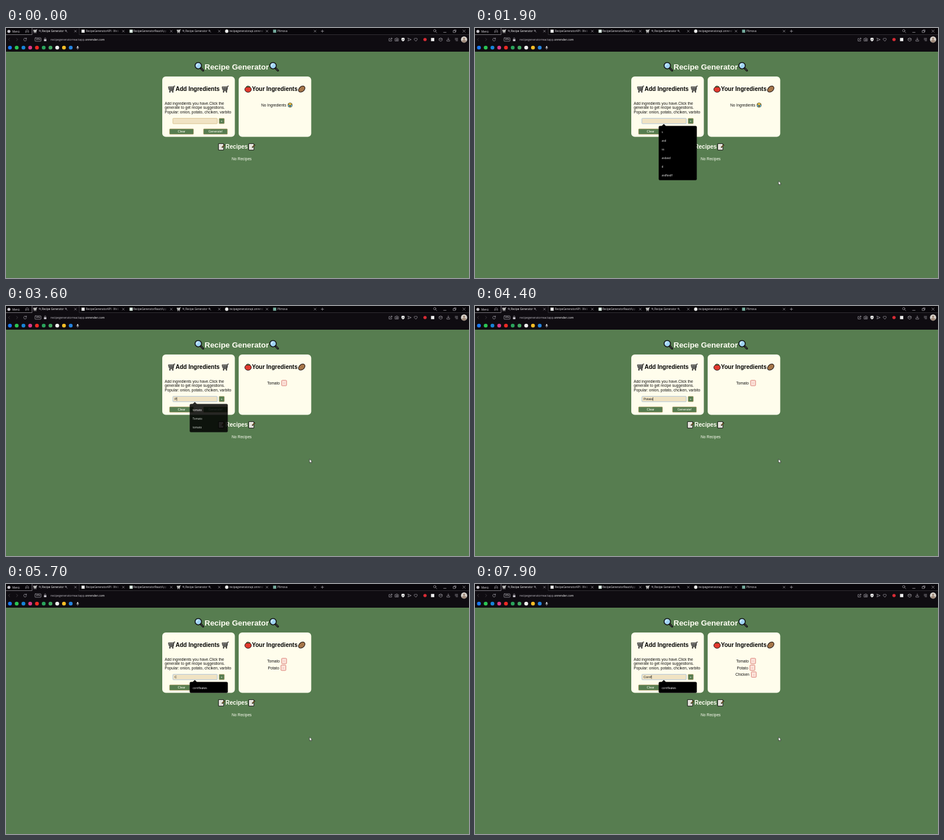
These frames come from a looping animation (800x433 px, 8000 ms). An HTML page:

```html
<!DOCTYPE html>
<html lang="en">
<head>
<meta charset="utf-8">
<title>Recipe Generator</title>
<style>
  html, body { margin: 0; width: 100%; height: 100%; overflow: hidden; background: #577d50; }
  svg { display: block; width: 100vw; height: 100vh; }
  text { font-family: "Liberation Sans", Arial, sans-serif; font-size: 6.667px; fill: #111; white-space: pre; }
  .ui text, #popup text { font-family: "Open Sans", "Noto Sans", sans-serif; fill: #e6e3e8; }
  .ui text { font-size: 4.7px; }
  .ui .url { font-size: 5.07px; }
  .ui .fade { fill: url(#fade); }
  #popup text { font-size: 4.65px; fill: #fff; }
  .h1 { font-size: 13.333px; font-weight: bold; }
  .h2 { font-size: 10px; font-weight: bold; fill: #000; }
  .light { fill: #fffff4; }
  .small { font-size: 5.56px; }
  .mid { text-anchor: middle; }
  .line { fill: none; stroke: #b9b5bd; stroke-width: .65; stroke-linecap: round; stroke-linejoin: round; }
  .button { fill: #577d50; stroke: #c3a267; stroke-width: .6; }
</style>
</head>
<body>
<svg viewBox="0 0 800 433" preserveAspectRatio="none" xmlns="http://www.w3.org/2000/svg">
  <defs>
    <linearGradient id="fade">
      <stop offset=".84" stop-color="#e6e3e8"/><stop offset="1" stop-color="#e6e3e8" stop-opacity=".15"/>
    </linearGradient>
    <symbol id="lens" viewBox="0 0 16 16">
      <path d="M10 10l4.2 4.2" stroke="#111" stroke-width="3.2" stroke-linecap="round"/>
      <path d="M11 11l2.8 2.8" stroke="#454545" stroke-width="1.3" stroke-linecap="round"/>
      <circle cx="6.2" cy="6.2" r="5.2" fill="#9fd3f5" stroke="#111" stroke-width="1.4"/>
      <path d="M3.6 7A3.2 3.2 0 0 1 6.6 3.4" fill="none" stroke="#e4f5ff" stroke-width="1.2"/>
    </symbol>
    <symbol id="cart" viewBox="0 0 12 12">
      <g fill="none" stroke="currentColor" stroke-linejoin="round" stroke-linecap="round">
        <path d="M.8 2.8l1.2 4.6h6.6l.9-4.6z" fill="#a5a5a0" stroke-width=".9"/>
        <path d="M3.4 3l.5 4.2M5.4 3v4.2M7.4 3L7 7.2M1.4 5.1h7.7" stroke-width=".55"/>
        <path d="M11.4 1.1H9.9L8.4 8.8H2.6" stroke-width="1"/>
      </g>
      <g fill="currentColor"><circle cx="3.2" cy="10.5" r="1.1"/><circle cx="7.9" cy="10.5" r="1.1"/></g>
    </symbol>
    <symbol id="memo" viewBox="0 0 13 13">
      <path d="M1.4 1h8.8v11H1.4z" fill="#f6f4ec" stroke="#111" stroke-width="1" stroke-linejoin="round"/>
      <path d="M3.2 3.6h4.6M3.2 5.6h3.8M3.2 7.6h3M3.2 9.6h5" stroke="#b4b2ac" stroke-width=".6"/>
      <path d="M7.8 7.2l3.7-3.7" stroke="#111" stroke-width="2" stroke-linecap="round"/>
      <path d="M8 7l3.4-3.4" stroke="#f2b33d" stroke-width="1"/>
    </symbol>
    <symbol id="sob" viewBox="0 0 10 10">
      <circle cx="5" cy="5" r="4.3" fill="#ffcf3f" stroke="#222" stroke-width=".8"/>
      <path d="M1.7 4.4h2.2v4.4l-2.2-1.1zM6.1 4.4h2.2v3.3l-2.2 1.1z" fill="#4aaee8"/>
      <path d="M1.8 4h2.2M6 4h2.2" stroke="#222" stroke-width=".7"/>
      <ellipse cx="5" cy="6.6" rx="1.1" ry="1.4" fill="#3a2418"/>
    </symbol>
  </defs>

  <rect width="800" height="433" fill="#577d50"/>

  <g class="ui">
    <rect width="800" height="41" fill="#0f0c11"/>
    <rect width="800" height="11.5" fill="#08060a"/>
    <rect x="45" width="81" height="12" fill="#0f0c11"/>
    <path d="M0 11.5H45V0" fill="none" stroke="#a6a3a9" stroke-width=".7"/>
    <path d="M126.5 0V11.5H800" fill="none" stroke="#4c4850" stroke-width=".6"/>
    <circle cx="5" cy="5.8" r="2.6" fill="#c9c6cc"/>
    <text x="11" y="7.6">Menü</text>
    <path class="line" d="M34 7.5V5.5q0-2 2.5-2t2.5 2v2l-1.3-1h-2.4z"/>

    <use href="#cart" x="47" y="2" width="7" height="7" color="#eee"/>
    <use href="#cart" x="295" y="2" width="7" height="7" color="#eee"/>
    <text x="62" y="7.4" style="fill:#fff">Recipe Generator</text>
    <text x="310" y="7.4">Recipe Generator</text>
    <g id="tabLenses" class="line"></g>
    <rect x="130.5" y="2.8" width="5.4" height="5.4" fill="#eee"/>
    <text class="fade" x="138" y="7.4">RecipeGeneratorAPI · Web</text>
    <rect x="213.5" y="2.8" width="5.4" height="5.4" fill="#dff2e6"/>
    <text class="fade" x="220" y="7.4">RecipeGeneratorReactApp</text>
    <circle cx="381.4" cy="5.5" r="2.9" fill="#e9e9e9"/>
    <text class="fade" x="386" y="7.4">recipegeneratorapi.onrend</text>
    <rect x="461.5" y="2.8" width="5.4" height="5.4" fill="#74aa9c"/>
    <text x="469" y="7.4">Plimova</text>
    <path id="tabClose" class="line"/>
    <path class="line" d="M544.5 5.5h4.4M546.7 3.3v4.4"/>
    <circle class="line" cx="740.8" cy="4.6" r="2"/>
    <path class="line" d="M742.4 6.2l2 2M756 7.5h4.5M773 4.5h3.3v3.3H773zM774.2 4.3V3.2h3.3v3.3h-1M789.3 3.3l4.2 4.2M793.5 3.3l-4.2 4.2"/>

    <path class="line" d="M6.5 17.7L4.2 20l2.3 2.3M18 17.7l2.3 2.3-2.3 2.3" opacity=".4"/>
    <path class="line" d="M35 18.4a2.5 2.5 0 1 0 .5 2.2M35.4 17.2v1.7h-1.7"/>
    <rect class="line" x="50" y="17" width="10.5" height="6" rx="1"/>
    <text x="55.3" y="21.3" class="mid" style="font-size:3.6px">VPN</text>
    <rect x="65.6" y="19.4" width="4.2" height="3.4" rx=".5" fill="#d2ced6"/>
    <path class="line" d="M66.5 19.4v-1q0-1.3 1.2-1.3t1.2 1.3v1"/>
    <text class="url" x="77" y="22" style="fill:#bdb9c1">recipegeneratorreactapp.<tspan fill="#fff">onrender.com</tspan></text>

    <path class="line" d="M663.5 18.2h-1.7v4.3h4.6v-1.5M664 20.5q0-2.4 3-2.4M665.7 16.8l1.5 1.3-1.5 1.3M672.5 18.3h1.2l.6-1h1.8l.6 1h1.2v4.2h-5.4z"/>
    <circle class="line" cx="675.2" cy="20.3" r="1.1"/>
    <path d="M683.3 17.6l2.7-.8 2.7.8v2.6q0 2-2.7 3-2.7-1-2.7-3z" fill="#eee"/>
    <path d="M684.7 20l1 1 1.7-1.9" fill="none" stroke="#111" stroke-width=".7"/>
    <path class="line" d="M694.6 17.6l5.6 2.4-5.6 2.4.8-2.4zM708 22.7l-2.5-2.5c-1.2-1.6 1.2-3.6 2.5-1.7 1.3-1.9 3.7.1 2.5 1.7z"/>
    <circle cx="724" cy="20" r="2.8" fill="#d92c36"/>
    <rect x="734.4" y="17.2" width="5.6" height="5.6" fill="#eee"/>
    <path class="line" d="M748.5 18.5l2.6-1.4 2.6 1.4v3l-2.6 1.4-2.6-1.4zM748.5 18.5l2.6 1.3 2.6-1.3M764.2 17v3.7M762.6 19.2l1.6 1.6 1.6-1.6M761.7 21v1.7h5V21M776 18h4.5M776 20h4.5M777.5 22h3"/>
    <circle cx="791.5" cy="20" r="5.4" fill="#d8d3cc"/>
    <path d="M787.4 23.4q.6-3 4.1-3t4.1 3q-4.1 3.6-8.2 0z" fill="#a08a7a"/>
    <circle cx="791.5" cy="18.5" r="1.9" fill="#a08a7a"/>
    <g id="marks"></g>
    <rect x="122.8" y="31.2" width="2" height="3.6" rx="1" fill="#eee"/>
    <path class="line" d="M121.7 33.8q0 2 2.1 2t2.1-2M123.8 36v1"/>
  </g>

  <use href="#lens" x="325.6" y="58.6" width="17" height="17"/>
  <text class="h1 light" x="343" y="71.5">Recipe Generator</text>
  <use href="#lens" x="454.8" y="58.6" width="17" height="17"/>

  <g fill="#fffdec">
    <rect x="270" y="84" width="125.4" height="104.4" rx="6"/>
    <rect x="402" y="84" width="125.4" height="104.4" rx="6"/>
  </g>
  <use href="#cart" x="279.8" y="99.3" width="12.8" height="12.8" color="#222"/>
  <text class="h2" x="293" y="109">Add Ingredients</text>
  <use href="#cart" x="372.5" y="99.3" width="12.8" height="12.8" color="#222"/>
  <text x="274.2" y="132.9">Add ingredients you have.Click the</text>
  <text x="274.2" y="140.4">generate to get recipe suggestions.</text>
  <text x="274.2" y="147.9">Popular: onion, potato, chciken, varbito</text>

  <rect id="field" x="288.3" y="156.4" width="76.8" height="9.4" rx="1.2" fill="#f0e3c3" stroke-width=".7"/>
  <text id="typed" class="small" x="291.2" y="163.1"></text>
  <path id="caret" stroke="#111" stroke-width=".6"/>
  <rect class="button" x="368.2" y="156.4" width="9" height="9.4" rx="1"/>
  <text class="small light mid" x="372.7" y="163">+</text>
  <rect class="button" x="282.6" y="174.7" width="41.4" height="9.4" rx="1"/>
  <text class="small light mid" x="303.3" y="181.4">Clear</text>
  <rect class="button" x="341.2" y="174.7" width="41.4" height="9.4" rx="1"/>
  <text class="small light mid" x="362" y="181.4">Generate!</text>

  <g stroke="#1a1010">
    <ellipse cx="418.3" cy="106.4" rx="5.6" ry="4.9" fill="#e23a2e"/>
    <path d="M418.3 102.6l-3.4-1 2.3-.6.9-1.2.9 1.2 2.7.4z" fill="#3d8b37" stroke-width=".6"/>
    <ellipse cx="511" cy="105.8" rx="6.3" ry="4.3" transform="rotate(-40 511 105.8)" fill="#a9794c"/>
    <path d="M508 107.5h.5M511 104h.5M513 106h.5M510.5 109h.4M513.7 102.5h.4" stroke="#644122" stroke-width=".8"/>
  </g>
  <text class="h2" x="425" y="109">Your Ingredients</text>
  <g id="none">
    <text x="441" y="135.9">No Ingredients</text>
    <use href="#sob" x="486.3" y="129" width="9" height="9"/>
  </g>
  <g id="items"></g>

  <use href="#memo" x="365.8" y="199.3" width="13" height="13"/>
  <text class="h2 light" x="379.3" y="209.3">Recipes</text>
  <use href="#memo" x="418" y="199.3" width="13" height="13"/>
  <text class="light" x="390" y="228.6">No Recipes</text>

  <g id="popup">
    <path d="M322.3 170l3.9-3.8 3.9 3.8z"/>
    <rect id="panel" x="317.5" y="169.7" width="65.6" rx="2" stroke="#242424" stroke-width=".4"/>
    <g id="rows"></g>
  </g>

  <path id="beam" d="M-1.3-3h2.6M0-3v6M-1.3 3h2.6" fill="none" stroke="#333" stroke-width=".6"/>
  <path id="arrow" d="M0 0v6.6l1.5-1.4 1 2.3 1.1-.5-1-2.2h2.1z" fill="#fff" stroke="#111" stroke-width=".5"/>
</svg>

<script>
const LOOP = 8000;
const $ = id => document.getElementById(id);
const show = (el, on) => { el.style.display = on ? '' : 'none'; };

// Browser details that repeat
$('tabClose').setAttribute('d', [120, 202.7, 285.5, 368.5, 451, 534]
  .map(x => `M${x - 1.6} 3.9l3.2 3.2M${x + 1.6} 3.9l-3.2 3.2`).join(''));
$('tabLenses').innerHTML = [57, 102, 305, 350]
  .map(x => `<circle cx="${x + 1.3}" cy="4.7" r="1.1"/><path d="M${x + 2.1} 5.6l1.6 1.7"/>`).join('');
$('marks').innerHTML = ['#1877f2', '#2bc553', '#1684d8', '#d93a86', '#ee2a24',
  '#2aa35b', '#43a862', '#f1f1f1', '#f7bd26', '#2583e0']
  .map((color, i) => `<circle cx="${6.8 + i * 11.67}" cy="34" r="3.3" fill="${color}"/>`).join('');

const lists = {
  recent: ['s', 'asd', 'ss', 'asdasd', 'd', 'asdfasdf'],
  tomato: ['tomato', 'Tomato', 'tomato'],
  corn: ['cornfleakes']
};
// from, to, list, fade-out time
const POPUPS = [[1300, 2300, 'recent'], [2300, 3570, 'tomato', 200], [5150, 5800, 'corn'], [7000, LOOP, 'corn']];

// word, time of each key, time it is submitted
const WORDS = [
  ['Tomato', [2300, 2400, 2500, 2600, 2700, 2800], 3000],
  ['Potato', [3550, 3700, 3800, 3900, 4050, 4200], 4700],
  ['Chicken', [5150, 5800, 5900, 6000, 6100, 6200, 6300], 6500],
  ['Cornf', [7000, 7300, 7400, 7600, 7700], LOOP]
];
// name, text x, button x
const ITEMS = [['Tomato', 451.2, 476.2], ['Potato', 452.6, 475], ['Chicken', 450, 477.4]];
const FOCUS = 1300;

function input(t) {
  let state = { text: '', last: FOCUS, added: 0 };
  for (const [word, keys, sent] of WORDS) {
    const count = keys.filter(k => k <= t).length;
    if (!count) break;
    state = t < sent
      ? { text: word.slice(0, count), last: keys[count - 1], added: state.added }
      : { text: '', last: sent, added: state.added + 1 };
  }
  return state;
}

function drawInput(t) {
  const { text, last, added } = input(t);
  const focused = t >= FOCUS;
  $('typed').textContent = text;
  $('field').setAttribute('stroke', focused ? '#92b5dc' : '#cdb278');
  const x = 291.4 + (text ? $('typed').getComputedTextLength() : 0);
  $('caret').setAttribute('d', `M${x} 158v6.2`);
  show($('caret'), focused && (t - last) % 1000 < 500);

  show($('none'), !added);
  $('items').innerHTML = ITEMS.slice(0, added).map(([name, tx, bx], i) => {
    const y = 128.7 + i * 11.7;
    return `<text x="${tx}" y="${y + 7.1}">${name}</text>
      <rect x="${bx}" y="${y}" width="8.6" height="9.4" rx="1.2" fill="#fbe1d8" stroke="#d4685f" stroke-width=".8"/>
      <text class="small mid" style="fill:#c8443c" x="${bx + 4.3}" y="${y + 6.4}">-</text>`;
  }).join('');
}

function drawPopup(t) {
  const open = POPUPS.find(([from, to, , out = 0]) => t >= from && t < to + out);
  show($('popup'), open);
  if (!open) return;
  const [, to, key, out] = open;
  const rows = lists[key];
  $('popup').setAttribute('opacity', t < to ? 1 : 1 - (t - to) / out);
  $('panel').setAttribute('height', 18.8 + 15 * (rows.length - 1));
  $('rows').innerHTML = rows.map((s, i) => `<text x="322.6" y="${181.6 + i * 15}">${s}</text>`).join('');
}

function drawPointer(t) {
  const ease = (from, to) => {
    const p = Math.min(1, Math.max(0, (t - from) / (to - from)));
    return p * p * (3 - 2 * p);
  };
  const go = ease(400, 900), back = ease(1400, 1800);
  const x = 430 - 110 * go + 204.4 * back;
  const y = 240 - 77 * go + 102 * back;
  const inField = x > 288 && x < 365 && y > 156 && y < 166;
  for (const id of ['beam', 'arrow']) {
    $(id).setAttribute('transform', `translate(${x} ${y})`);
    show($(id), t >= 400 && inField === (id === 'beam'));
  }
}

function frame() {
  const t = performance.now() % LOOP;
  drawInput(t);
  drawPopup(t);
  drawPointer(t);
  requestAnimationFrame(frame);
}
frame();
</script>
</body>
</html>
```
